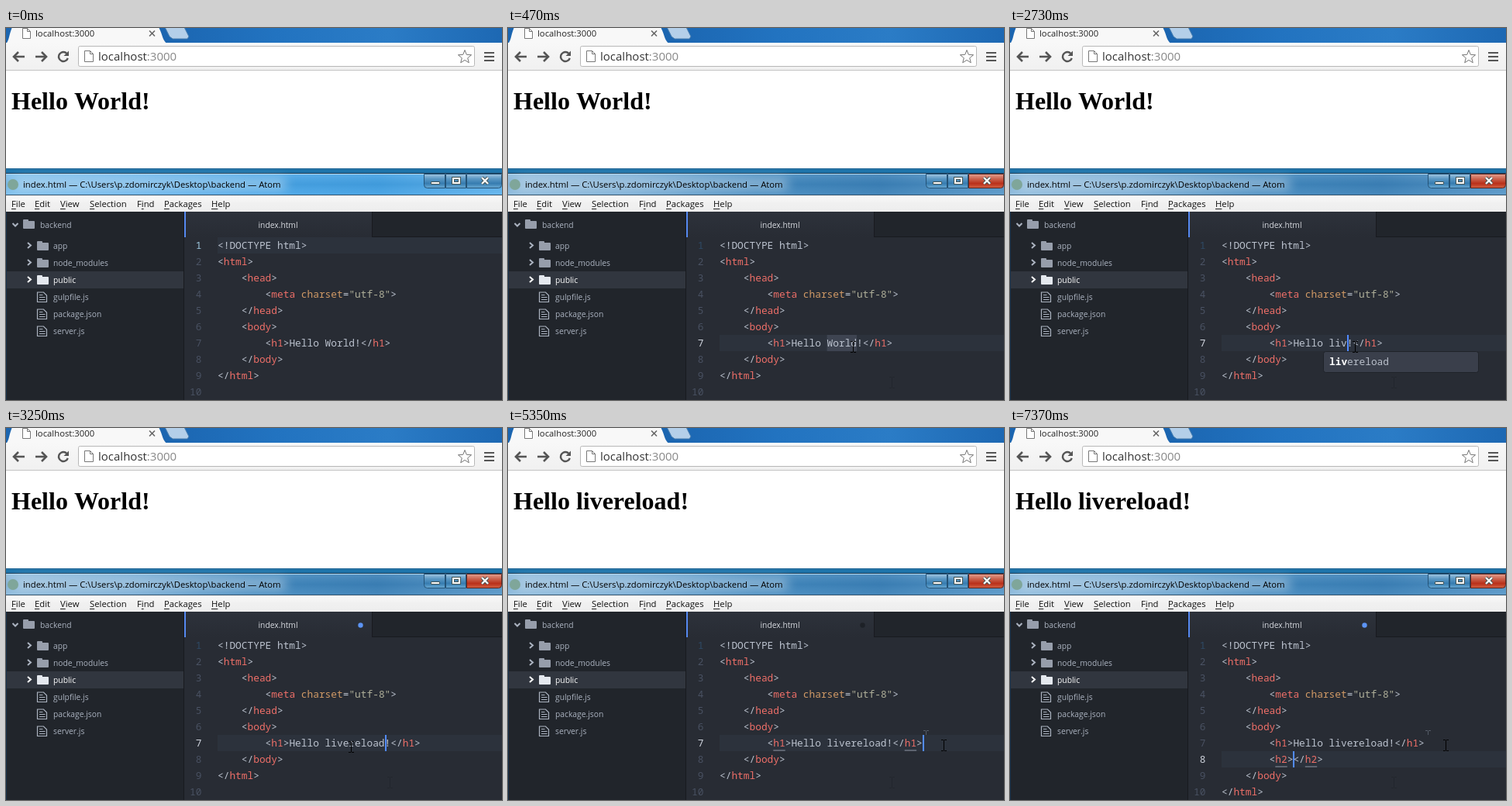
Recreate the animation shown at these times as an HTML page with a canvas. Size 640 px wide and 480 px high, loop 8 s.

```html
<!DOCTYPE html>
<html lang="en">
<head>
<meta charset="utf-8">
<title>Live reload</title>
<style>
  html, body { margin: 0; width: 100%; height: 100%; overflow: hidden; background: #fff; }
  canvas { display: block; width: 640px; height: 480px; }
</style>
</head>
<body>
<canvas width="640" height="480"></canvas>
<script>
const ctx = document.querySelector('canvas').getContext('2d');
const LOOP = 8000;
const CODE = '12.83px "Noto Sans Mono", monospace';
const CHAR = 7.7, CODE_X = 273, LINE_H = 21, CODE_Y = 270;
const PLAIN = '#bcc3cf', TAG = '#ee6f68', ATTR = '#d19a66', STRING = '#b0b09a', CARET = '#528bff';
const SIDE = '#abb3c0', FOLDER = '#979eab';
const ui = size => `${size}px "Open Sans", sans-serif`;

// Latest value whose start time has passed.
const step = (t, keys) => keys.reduce((v, [start, value]) => t >= start ? value : v, keys[0][1]);
const clamp = v => Math.max(0, Math.min(1, v));

function rect(x, y, w, h, fill) {
  ctx.fillStyle = fill;
  ctx.fillRect(x, y, w, h);
}

function box(x, y, w, h, radius, fill, stroke) {
  ctx.beginPath();
  ctx.roundRect(x, y, w, h, radius);
  if (fill) { ctx.fillStyle = fill; ctx.fill(); }
  if (stroke) { ctx.strokeStyle = stroke; ctx.lineWidth = 1; ctx.stroke(); }
}

function text(str, x, y, font, color, align = 'left') {
  ctx.font = font;
  ctx.fillStyle = color;
  ctx.textAlign = align;
  ctx.fillText(str, x, y);
}

function line(points, color, width = 1) {
  ctx.beginPath();
  points.forEach(([x, y], i) => i ? ctx.lineTo(x, y) : ctx.moveTo(x, y));
  ctx.strokeStyle = color;
  ctx.lineWidth = width;
  ctx.stroke();
}

function shape(points, fill, stroke) {
  ctx.beginPath();
  points.forEach(([x, y]) => ctx.lineTo(x, y));
  ctx.closePath();
  ctx.fillStyle = fill;
  ctx.fill();
  if (stroke) { ctx.strokeStyle = stroke; ctx.lineWidth = 1; ctx.stroke(); }
}

function gradient(x0, y0, x1, y1, ...colors) {
  const g = ctx.createLinearGradient(x0, y0, x1, y1);
  colors.forEach((c, i) => g.addColorStop(i / (colors.length - 1), c));
  return g;
}

function dot(x, y, r, fill) {
  ctx.beginPath();
  ctx.arc(x, y, r, 0, 7);
  ctx.fillStyle = fill;
  ctx.fill();
}

function cross(x, y, r, color, width) {
  line([[x - r, y - r], [x + r, y + r]], color, width);
  line([[x + r, y - r], [x - r, y + r]], color, width);
}

function pageIcon(x, y, w, h) {
  shape([[x, y], [x + w - 4, y], [x + w, y + 4], [x + w, y + h], [x, y + h]], '#fff', '#777');
  line([[x + w - 4, y], [x + w - 4, y + 4], [x + w, y + 4]], '#777');
}

function drawArrow(x, dir) {
  line([[x - 7 * dir, 37], [x + 6 * dir, 37]], '#555', 2.6);
  line([[x + dir, 31], [x + 7 * dir, 37], [x + dir, 43]], '#555', 2.6);
}

function drawBrowser(heading) {
  rect(0, 0, 640, 20, gradient(200, 0, 640, 0, '#1b65b0', '#2273c0', '#2b7cc6', '#1d68b3'));
  shape([[205, -1], [230, -1], [236, 11], [234, 14], [215, 14], [211, 11]], '#b4cfe9', '#447bae');
  rect(0, 19, 640, 36, gradient(0, 19, 0, 55, '#f8f8f8', '#f0f0f0'));
  ctx.beginPath();
  ctx.moveTo(0, 20);
  ctx.bezierCurveTo(4, 17, 4, 8, 8, -1);
  ctx.lineTo(197, -1);
  ctx.bezierCurveTo(202, 8, 202, 17, 208, 20);
  ctx.fillStyle = '#f8f8f8';
  ctx.fill();
  pageIcon(21.5, 0.5, 10, 13);
  text('localhost:3000', 38, 11, ui(11.3), '#222');
  cross(188.5, 7, 3.5, '#666', 1.6);

  drawArrow(17, -1);
  drawArrow(45, 1);
  ctx.beginPath();
  ctx.arc(74, 37, 6, 0.3, 5.5);
  ctx.strokeStyle = '#555';
  ctx.lineWidth = 2.4;
  ctx.stroke();
  shape([[81, 29.5], [81, 36], [74.5, 36]], '#555');

  box(93.5, 23.5, 511, 26, 2, '#fff', '#b8b8b8');
  pageIcon(101.5, 29.5, 11, 14);
  text('localhost', 119, 42, ui(15), '#333');
  text(':3000', 119 + ctx.measureText('localhost').width, 42, ui(15), '#888');
  const star = Array.from({ length: 10 }, (_, i) => {
    const a = i * Math.PI / 5 - Math.PI / 2, r = i % 2 ? 3.9 : 9;
    return [592 + r * Math.cos(a), 37.5 + r * Math.sin(a)];
  });
  shape(star, '#fff', '#777');
  for (const y of [31, 36, 41]) rect(617, y, 13, 2, '#555');

  rect(0, 54, 640, 1, '#c4c4c4');
  rect(0, 55, 640, 127, '#fff');
  text(heading, 7, 105, 'bold 32px "Liberation Serif", serif', '#000');
}

function drawTitleBar(active) {
  rect(0, 181, 640, 7, gradient(0, 181, 0, 187, '#2d6c98', '#1a75ad', '#2272a6'));
  rect(0, 187, 640, 1, '#173a56');
  rect(0, 188, 640, 28, active
    ? gradient(0, 0, 640, 0, '#8dbbdd', '#74abd5', '#458bc0', '#3d82b8', '#5b9aca')
    : gradient(0, 0, 640, 0, '#7dc0ed', '#68b5ec', '#4ba7e8', '#44a2e4', '#63b5ee'));
  rect(0, 188, 640, 28, gradient(0, 188, 0, 216, 'rgba(255,255,255,.1)', 'rgba(10,60,110,.08)', 'rgba(255,255,255,.04)'));
  rect(0, 188, 640, 1, '#b5d9f0');
  ctx.save();
  ctx.filter = 'blur(7px)';
  box(8, 194, 354, 15, 7, 'rgba(255,255,255,.4)');
  ctx.restore();
  rect(0, 215, 640, 1, '#35536b');
  dot(9, 202, 7, '#7fa69a');
  text('index.html — C:\\Users\\p.zdomirczyk\\Desktop\\backend — Atom', 22, 206, ui(11.3), '#000');

  const glass = gradient(0, 188, 0, 207, '#a9cbe4', '#5d99c5', '#367cb0', '#70afd7');
  const red = gradient(0, 188, 0, 207, '#e5a596', '#cc6651', '#b9301a', '#d66748');
  box(539.5, 188.5, 27, 18, [0, 0, 0, 4], glass, '#245377');
  box(567.5, 188.5, 26, 18, 0, glass, '#245377');
  box(594.5, 188.5, 45, 18, [0, 0, 4, 0], active ? red : glass, active ? '#5a2520' : '#245377');
  box(548.5, 198.5, 11, 3, 0, '#fff', '#455');
  ctx.strokeStyle = '#455';
  ctx.lineWidth = 4;
  ctx.strokeRect(577, 194, 8, 6);
  ctx.strokeStyle = '#fff';
  ctx.lineWidth = 2;
  ctx.strokeRect(577, 194, 8, 6);
  cross(618, 197, 4, '#455', 4);
  cross(618, 197, 4, '#fff', 2.3);
}

function drawMenu() {
  rect(0, 216, 640, 21, gradient(0, 216, 0, 237, '#fafafa', '#f0f0f0', '#eeeeee'));
  const items = [['File', 7], ['Edit', 37], ['View', 70], ['Selection', 108], ['Find', 169, 1], ['Packages', 204], ['Help', 265]];
  for (const [label, x, key = 0] of items) {
    text(label, x, 231, ui(11.3), '#111');
    const left = x + ctx.measureText(label.slice(0, key)).width;
    rect(left, 233, ctx.measureText(label[key]).width, 1, '#222');
  }
}

function folder(x, y, color) {
  box(x, y - 6, 7, 4, 1, color);
  box(x, y - 4, 15, 10, 1, color);
}

function fileIcon(x, y) {
  line([[x, y - 6], [x + 8, y - 6], [x + 12, y - 2], [x + 12, y + 6.5], [x, y + 6.5], [x, y - 6.5]], SIDE, 1.2);
  for (const dy of [-2.5, 0.5, 3.5]) line([[x + 2.5, y + dy], [x + (dy < 0 ? 7 : 10), y + dy]], SIDE);
}

function drawSidebar() {
  rect(0, 237, 230, 243, '#21252b');
  rect(0, 314, 229, 22, '#31363f');
  rect(229, 237, 1, 243, '#181a1f');
  rect(0, 237, 1, 243, '#17314a');
  line([[8.5, 252], [12, 255.5], [15.5, 252]], SIDE, 2);
  folder(22, 253, FOLDER);
  text('backend', 44, 258, ui(10.3), SIDE);
  ['app', 'node_modules', 'public', 'gulpfile.js', 'package.json', 'server.js'].forEach((name, i) => {
    const y = 281 + 22 * i, color = i === 2 ? '#fff' : SIDE;
    if (i < 3) {
      line([[28, y - 4], [32, y - 0.5], [28, y + 3]], color, 2);
      folder(40, y, i === 2 ? '#e4e8ee' : FOLDER);
    } else {
      fileIcon(40.5, y);
    }
    text(name, 61, y + 4, ui(10.3), color);
  });
}

// Splits one markup line into coloured pieces.
function tokens(source) {
  return source.match(/<\/?!?|\/?>|"[^"]*"|[^<>"]+/g).reduce((out, part) => {
    const prev = out.length ? out[out.length - 1][0] : '';
    if (part[0] === '"') out.push([part, STRING]);
    else if (prev === '<' || prev === '</') {
      const [name, attr] = part.split(/ (?=\w)/);
      out.push([name, TAG]);
      if (attr) out.push([' ' + attr.replace('=', ''), ATTR], ['=', PLAIN]);
    } else out.push([part, PLAIN]);
    return out;
  }, []);
}

function drawCode(source, row) {
  const y = CODE_Y + row * LINE_H + 15;
  let x = CODE_X;
  for (const [part, color] of source.includes('DOCTYPE') ? [[source, PLAIN]] : tokens(source)) {
    text(part, x, y, CODE, color);
    x += part.length * CHAR;
  }
}

function drawEditor(s) {
  rect(230, 237, 410, 243, '#282c34');
  rect(473, 237, 167, 32, '#21252b');
  rect(231, 237, 241, 32, gradient(0, 237, 0, 270, '#2d323b', '#282c34'));
  rect(472, 237, 1, 33, '#181a1f');
  rect(473, 269, 167, 1, '#181a1f');
  rect(230, 237, 2, 33, '#568af2');
  text('index.html', 351, 258, ui(10.3), '#d7dae0', 'center');
  if (s.dot) dot(457.5, 254.5, 3.2, s.dot);
  const top = CODE_Y + s.row * LINE_H;
  rect(CODE_X, top, 640 - CODE_X, LINE_H, '#2c323c');
  for (let i = 0; i < 10; i++) {
    const color = i === s.row ? (i ? '#d0d5de' : '#9dc7df') : i ? '#495162' : '#2e4a66';
    text(i + 1, 252.5, CODE_Y + i * LINE_H + 15, CODE, color, 'right');
  }
  if (s.selected) rect(CODE_X + 18 * CHAR, top, 5 * CHAR, LINE_H, '#3e4451');
  s.lines.forEach((source, i) => { if (source.trim()) drawCode(source, i); });
  for (const col of s.underlines) rect(CODE_X + col * CHAR, top + 19.5, 2 * CHAR, 1, '#8d94a2');
  if (s.caret !== null) rect(Math.round(CODE_X + s.caret * CHAR), top, 2, LINE_H, CARET);
}

function drawPopup(x, y, w, label, typed, textX) {
  box(x + 0.5, y + 0.5, w - 1, 27, 3, '#3a3f4b', '#1f2329');
  text(typed, textX, y + 18, 'bold ' + CODE, '#fff');
  text(label.slice(typed.length), textX + typed.length * CHAR, y + 18, CODE, '#b9bfca');
}

function beam(x, y, color, height = 15) {
  const top = Math.round(y - 7), left = Math.round(x);
  rect(left - 3, top, 3, 1, color);
  rect(left + 1, top, 3, 1, color);
  rect(left, top + 1, 1, height - 2, color);
  if (height < 15) return;
  rect(left - 3, top + 14, 3, 1, color);
  rect(left + 1, top + 14, 3, 1, color);
}

const MOUSE = [[170, 510, 486], [380, 445, 411], [4950, 445, 411], [5190, 539, 397], [5350, 562, 409], [LOOP, 562, 409]];

function mouseAt(t) {
  const i = MOUSE.findIndex(([time]) => time > t);
  if (i < 1) return null;
  const [t0, x0, y0] = MOUSE[i - 1], [t1, x1, y1] = MOUSE[i];
  const k = clamp((t - t0) / (t1 - t0));
  return [x0 + (x1 - x0) * k, y0 + (y1 - y0) * k];
}

function stateAt(t) {
  const word = step(t, [[0, 'World'], [2590, 'l'], [2630, 'li'], [2690, 'liv'], [2810, 'live'], [3250, 'livereload']]);
  const second = step(t, [[0, ''], [6580, 'h'], [7000, 'h2'], [7370, '<h2></h2>']]);
  const lines = ['<!DOCTYPE html>', '<html>', '    <head>', '        <meta charset="utf-8">', '    </head>',
    '    <body>', `        <h1>Hello ${word}!</h1>`, '    </body>', '</html>'];
  if (t >= 6240) lines.splice(7, 0, '        ' + second);
  const atLineEnd = t >= 5350 && t < 6240;
  let caret = null;
  if (t >= 6240) caret = 8 + (t >= 7370 ? 4 : second.length);
  else if (atLineEnd) caret = lines[6].length;
  else if (t >= 2590) caret = 18 + word.length;
  const underlines = atLineEnd ? [9, 31] : t >= 7370 ? [9, 14] : [];
  return {
    lines, caret, underlines, word, second,
    row: step(t, [[0, 0], [380, 6], [6240, 7]]),
    selected: t >= 470 && t < 2590,
    dot: step(t, [[0, ''], [3050, '#426094'], [3100, '#5c94f5'], [3940, '#426094'], [4040, '#1d2127'], [6640, '#426094'], [6720, '#5c94f5']]),
  };
}

function draw(t) {
  const s = stateAt(t);
  drawBrowser(t < 4100 ? 'Hello World!' : 'Hello livereload!');
  drawTitleBar(t >= 340);
  drawMenu();
  drawSidebar();
  drawEditor(s);
  if (t >= 2730 && t < 3250) drawPopup(404, 417, 201, 'livereload', s.word, 412);
  if (t >= 7060 && t < 7370) drawPopup(289, 438, 209, 'h2', 'h2', 334.6);
  // Faint trails left behind by the pointer.
  if (t >= 300) beam(495, 457, '#22262d');
  if (t >= 5350) beam(539, 397, '#555c68', 7);
  const mouse = mouseAt(t);
  if (mouse) beam(...mouse, '#000');
}

function frame(now) {
  draw(now % LOOP);
  requestAnimationFrame(frame);
}
requestAnimationFrame(frame);
</script>
</body>
</html>
```
